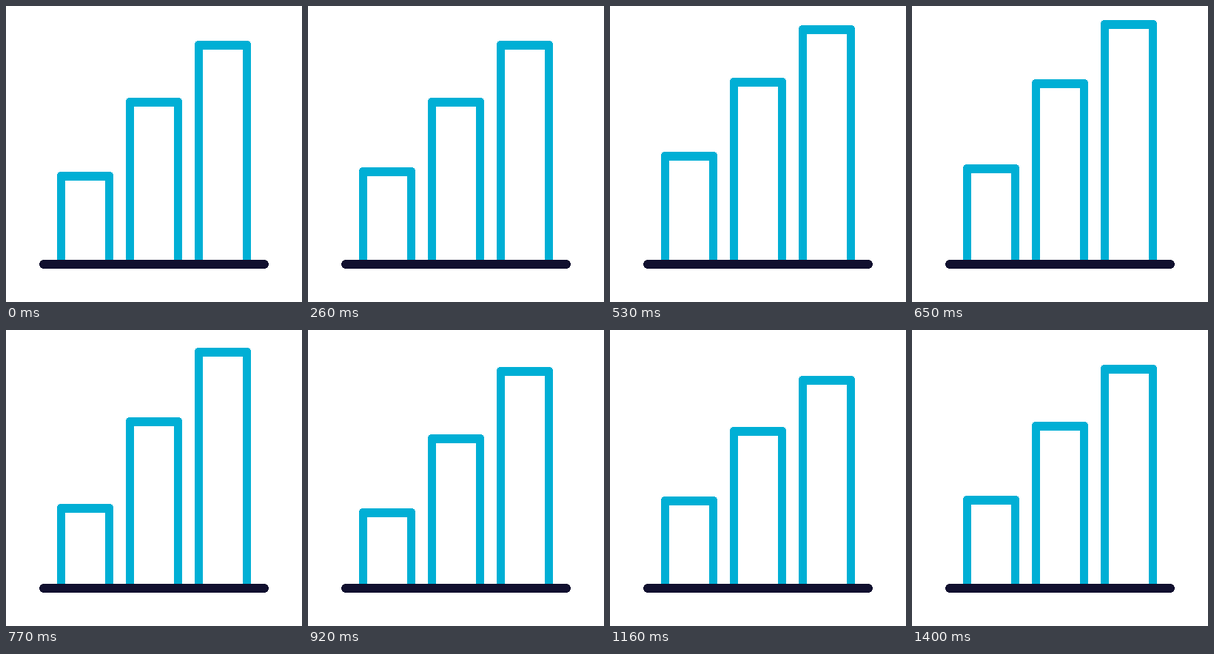
An HTML page that plays this animation: 400 by 400 pixels, repeating every 1430 ms.

```html
<!DOCTYPE html>
<html lang="en">
<head>
<meta charset="utf-8">
<title>Bar chart</title>
<style>
html, body { margin: 0; width: 100%; height: 100%; overflow: hidden; background: #fff; }
svg { display: block; width: 100vw; height: 100vh; }
</style>
</head>
<body>
<svg viewBox="0 0 400 400" shape-rendering="crispEdges">
  <g id="bars" fill="#00afd5" fill-rule="evenodd"></g>
  <rect x="45" y="343" width="310" height="12" rx="6" fill="#11102f"/>
</svg>
<script>
const LOOP = 1430, START = 230, STEP = 30, STAGGER = 100, FLOOR = 344;
const TOPS = [224, 124, 47];

// Each bar rises, dips below its rest height, then settles
const moves = [
  { from: 203, to: 486, y0: 0, y1: -28, ease: [0.3, 0.2] },
  { from: 486, to: 870, y0: -28, y1: 18.4, ease: [0.38, 0.62] },
  { from: 870, to: 1200, y0: 18.4, y1: 0, ease: [0.38, 0.62] }
];

// Cubic Bezier easing with control points (a, 0) and (b, 1)
function bezier(x, [a, b]) {
  let lo = 0, hi = 1;
  for (let i = 0; i < 24; i++) {
    const s = (lo + hi) / 2, r = 1 - s;
    if (3 * s * r * r * a + 3 * s * s * r * b + s ** 3 < x) lo = s;
    else hi = s;
  }
  return lo * lo * (3 - 2 * lo);
}

function bounce(t) {
  const m = moves.find(m => t >= m.from && t < m.to);
  if (!m) return 0;
  return m.y0 + (m.y1 - m.y0) * bezier((t - m.from) / (m.to - m.from), m.ease);
}

function shape(x, y) {
  return `M${x} ${FLOOR}V${y + 5}a5 5 0 0 1 5 -5h66a5 5 0 0 1 5 5V${FLOOR}z`
    + `M${x + 11} ${FLOOR}V${y + 12}h54V${FLOOR}z`;
}

const group = document.getElementById("bars");
const bars = TOPS.map(() =>
  group.appendChild(document.createElementNS("http://www.w3.org/2000/svg", "path")));

function draw(time) {
  const t = time % LOOP;
  const tick = t < START ? 0 : START + Math.floor((t - START) / STEP) * STEP;
  bars.forEach((bar, i) => {
    const y = Math.round(TOPS[i] + bounce(tick - i * STAGGER));
    bar.setAttribute("d", shape(69 + 93 * i, y));
  });
}

let begin;
function frame(now) {
  if (begin === undefined) begin = now;
  draw(Math.max(0, now - begin));
  requestAnimationFrame(frame);
}
draw(0);
requestAnimationFrame(frame);
</script>
</body>
</html>
```
